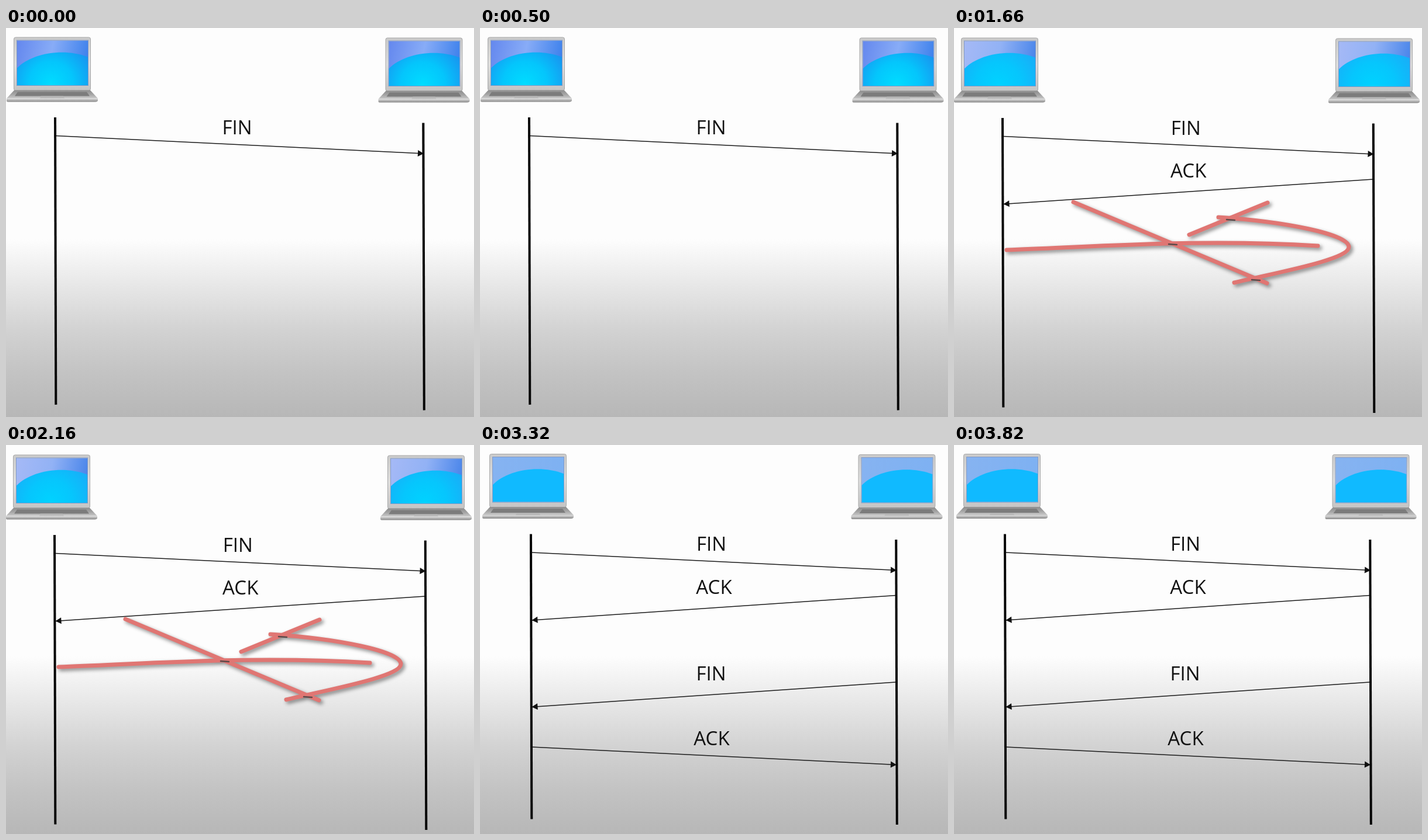
An HTML page with a canvas that plays this animation: 800 px wide and 666 px high, repeating every 4150 ms.

```html
<!DOCTYPE html>
<html lang="en">
<head>
<meta charset="utf-8">
<title>Connection teardown</title>
<style>
  html, body { margin: 0; width: 100%; height: 100%; overflow: hidden; background: #fff; }
  canvas { display: block; }
</style>
</head>
<body>
<canvas id="stage" width="800" height="666"></canvas>
<script>
const ctx = document.getElementById('stage').getContext('2d');
const STEP = 830;
const RIGHT_DROP = 9.5;

const VIVID = { sky: ['#6488ee', '#88acf7', '#3f82ec'], wave: ['#00dcff', '#04c6fc', '#1896f0'] };
const SOFT = { sky: ['#a5b9f6', '#92b2f5', '#4b86ea'], wave: ['#00d2ff', '#06c6fd', '#18aef8'] };
const FLAT = { sky: ['#86b3f1', '#7eb1f2'], wave: ['#10baff', '#10baff'] };

// heights are measured from the top of the left lifeline
const messages = [
  { text: 'FIN', y: 31.5, toRight: true, shift: -3.5 },
  { text: 'ACK', y: 105, toRight: false, shift: 1 },
  { text: 'FIN', y: 253.5, toRight: false, shift: -4 },
  { text: 'ACK', y: 364.5, toRight: true, shift: -3 }
];

const sketchRight = {
  color: '#e07673',
  path: 'M90 380C270 373 430 361 622 373M204 298L535 437M402 354L536 299' +
        'M452 324C560 331 675 352 675 375C675 396 560 417 479 436',
  smudges: 'M466 328l14 1M367 370l14 1M509 431l14 1'
};
const sketchLeft = {
  color: '#d04646',
  path: 'M157 388C330 381 500 389 701 393' +
        'M332 359C230 364 104 378 104 388C104 398 220 415 303 427'
};

// left and right are the lifeline positions
const scenes = [
  { left: 84, right: 713, top: 153, sent: 1, screen: VIVID },
  { left: 82, right: 707, top: 153.5, sent: 2, screen: VIVID },
  { left: 83, right: 716.5, top: 154, sent: 2, screen: SOFT, sketch: sketchRight },
  { left: 87.5, right: 717, top: 150, sent: 2, screen: SOFT, sketch: sketchLeft },
  { left: 87, right: 711, top: 152.5, sent: 4, screen: FLAT }
];

function addStops(gradient, colors) {
  colors.forEach((color, i) => gradient.addColorStop(i / (colors.length - 1), color));
  return gradient;
}

const linear = (x1, y1, x2, y2, ...colors) =>
  addStops(ctx.createLinearGradient(x1, y1, x2, y2), colors);

const radial = (x, y, radius, ...colors) =>
  addStops(ctx.createRadialGradient(x, y, 0, x, y, radius), colors);

function fill(path, style) {
  ctx.fillStyle = style;
  ctx.fill(new Path2D(path));
}

function drawLine(x1, y1, x2, y2, width, color) {
  ctx.strokeStyle = color;
  ctx.lineWidth = width;
  ctx.beginPath();
  ctx.moveTo(x1, y1);
  ctx.lineTo(x2, y2);
  ctx.stroke();
}

function drawBackground() {
  fill('M0 0H800V666H0Z', '#fdfdfd');
  fill('M0 362H800V666H0Z', linear(0, 362, 0, 666, '#fdfdfd', '#e8e8e8', '#d3d3d3', '#c3c3c3', '#b7b7b7'));
}

function drawLaptop(x, y, { sky, wave }) {
  ctx.save();
  ctx.translate(x, y);
  // lid
  ctx.beginPath();
  ctx.roundRect(0.5, 0.5, 131, 91, 3);
  ctx.fillStyle = linear(0, 0, 0, 92, '#cacaca', '#dedede', '#c4c4c4');
  ctx.fill();
  ctx.strokeStyle = '#a8a8a8';
  ctx.lineWidth = 1;
  ctx.stroke();
  // display
  fill('M6 6H127V82.5H6Z', linear(6, 6, 127, 30, ...sky));
  fill('M6 53C30 28 85 18 127 34V82.5H6Z', radial(64, 80, 76, ...wave));
  ctx.strokeStyle = '#8199c6';
  ctx.strokeRect(5.5, 5.5, 122, 77.5);
  // keyboard deck and front edge
  fill('M1 91H131L144 105H-12Z', linear(0, 91, 0, 105, '#8e8e8e', '#a4a4a4', '#cacaca'));
  fill('M7 94H125L130 101H2Z', '#7c7c7c');
  fill('M47 101H85L87 105H45Z', '#b7b7b7');
  fill('M-12 105H144V109Q143 111 140 111H-9Q-12 111 -12 109Z', linear(0, 105, 0, 111, '#dcdcdc', '#b4b4b4', '#858585'));
  ctx.restore();
}

function drawMessage({ text, y, toRight, shift }, { left, right, top }) {
  const [from, to] = toRight ? [left + 1, right + 1] : [right, left + 1.5];
  const startY = top + y;
  const endY = startY + (toRight ? 30.5 : 42.5);
  drawLine(from, startY, to, endY, 1.5, '#1c1c1c');

  ctx.save();
  ctx.translate(to, endY);
  ctx.rotate(Math.atan2(endY - startY, to - from));
  fill('M0 0L-10 -5.5V5.5Z', '#111');
  ctx.restore();

  ctx.font = '33px "Open Sans", sans-serif';
  ctx.textAlign = 'center';
  ctx.fillStyle = '#111';
  ctx.fillText(text, (left + right) / 2 + shift, startY - 3);
}

function drawSketch({ color, path, smudges = '' }) {
  ctx.save();
  ctx.lineCap = ctx.lineJoin = 'round';
  ctx.lineWidth = 7;
  ctx.strokeStyle = color;
  ctx.shadowColor = 'rgba(0,0,0,.45)';
  ctx.shadowBlur = 6;
  ctx.shadowOffsetX = ctx.shadowOffsetY = 3.5;
  ctx.stroke(new Path2D(path));
  ctx.shadowColor = 'transparent';
  ctx.lineWidth = 2.5;
  ctx.strokeStyle = '#5c4a4a';
  ctx.stroke(new Path2D(smudges));
  ctx.restore();
}

function drawScene(scene) {
  const { left, right, top, sent, screen, sketch } = scene;
  const length = (right - left) * 0.782;
  drawBackground();
  drawLaptop(left - 71, top - 137.5, screen);
  drawLaptop(right - 64.5, top - 136.5, screen);
  messages.slice(0, sent).forEach(message => drawMessage(message, scene));
  drawLine(left, top, left + 1.3, top + length, 4, '#050505');
  drawLine(right + 0.3, top + RIGHT_DROP, right + 1.8, top + RIGHT_DROP + length, 4, '#050505');
  if (sketch) drawSketch(sketch);
}

const start = performance.now();
function tick() {
  const elapsed = Math.max(0, performance.now() - start);
  drawScene(scenes[Math.floor(elapsed / STEP) % scenes.length]);
  requestAnimationFrame(tick);
}
tick();
</script>
</body>
</html>
```
